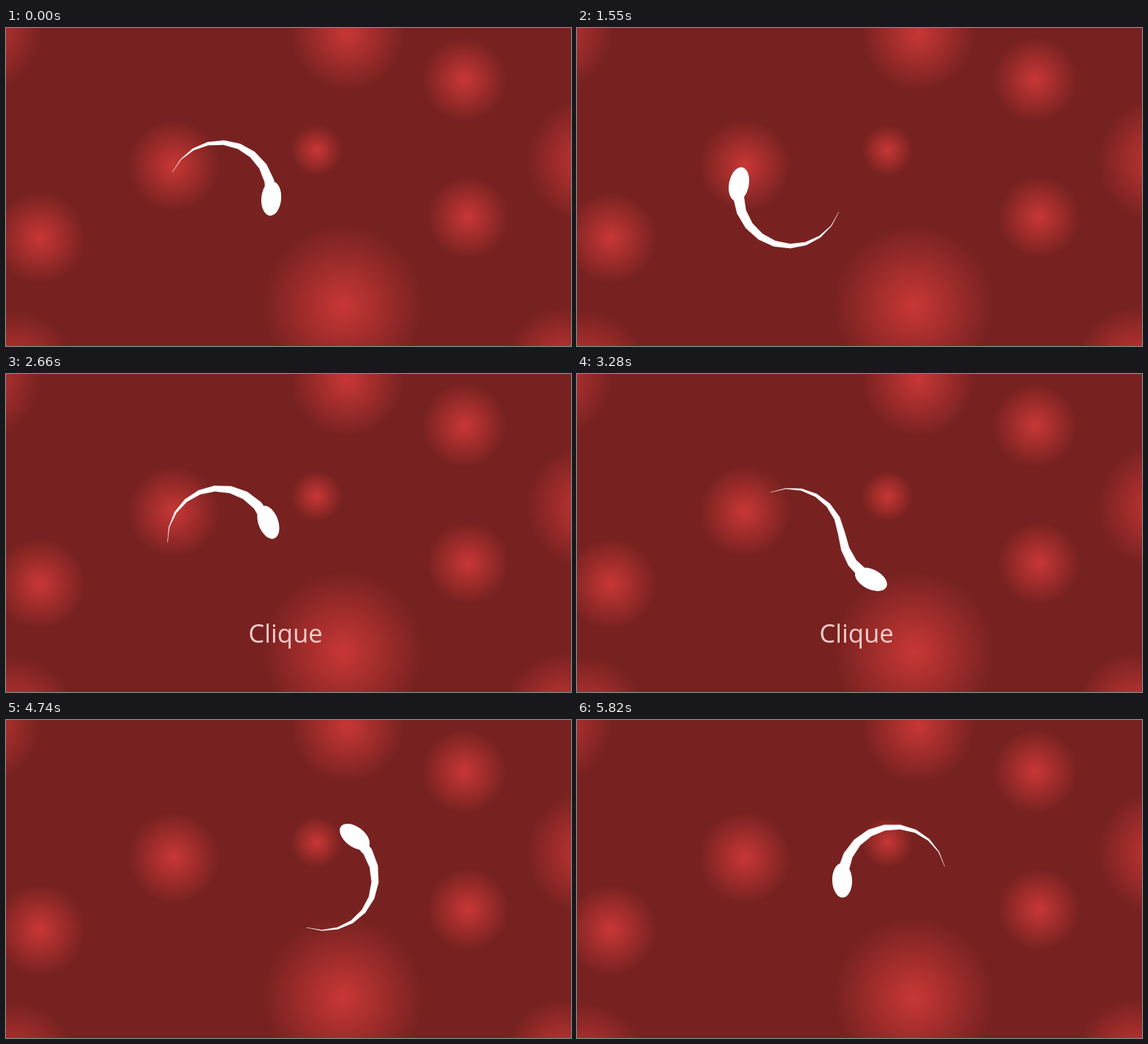
An HTML page with a canvas that plays this animation: 768 px wide and 432 px high, repeating every 5860 ms.

```html
<!DOCTYPE html>
<html lang="pt">
<head>
<meta charset="utf-8">
<title>Clique</title>
<style>
  html, body { margin: 0; width: 100%; height: 100%; overflow: hidden; background: #772220; }
  canvas { display: block; width: 768px; height: 432px; }
</style>
</head>
<body>
<canvas id="stage" width="768" height="432"></canvas>
<script>
const LOOP = 5860;
const canvas = document.getElementById('stage');
const ctx = canvas.getContext('2d');

// Background glows: x, y, radius
const GLOWS = [
  [464, 8, 77], [623, 70, 57], [422, 166, 34.5], [228, 187, 62],
  [46, 285, 62], [628, 257, 55.5], [458, 377, 109], [792, 180, 84],
  [758, 458, 79], [10, 470, 86], [-35, 4, 83]
];
canvas.style.background = GLOWS.map(([x, y, r]) =>
  `radial-gradient(${r}px at ${x}px ${y}px, #c83736, #c8373600)`
).join(',') + ', #772220';

// Key points of the ride: time in ms, degrees travelled
const RIDE = [
  [0, 0], [600, 69.4], [1260, 140], [1550, 186.2], [1890, 241], [2660, 335.2],
  [3690, 460], [3980, 481], [4350, 541], [4740, 580], [5820, 709], [LOOP, 709]
];
const RADIUS = 71;
const START = 4.6;            // angle on the left circle
const SWITCH = 351.2;         // degrees travelled before the turn flips
const LEFT = { x: 289.8, y: 225.8 };
const RIGHT = { x: 431.4, y: 215.4 };

// Trail points stay where they are dropped, at even spacing
const GAP = 17.5, TRAIL_START = -159.6, TRAIL_COUNT = 10, TAPER = 1.72;
const TRAIL_RADIUS = 70.4;

const rad = deg => deg * Math.PI / 180;

function travelled(t) {
  const i = RIDE.findIndex(([time]) => time > t);
  const [t0, s0] = RIDE[i - 1], [t1, s1] = RIDE[i];
  return s0 + (s1 - s0) * (t - t0) / (t1 - t0);
}

// Position and unit heading after travelling s degrees of the figure eight
function pathAt(s, radius) {
  const right = s > SWITCH;
  const c = right ? RIGHT : LEFT;
  const a = rad(right ? START + 2 * SWITCH - 180 - s : START + s);
  const dir = right ? -1 : 1;
  return {
    x: c.x + radius * Math.cos(a), y: c.y + radius * Math.sin(a),
    dx: -Math.sin(a) * dir, dy: Math.cos(a) * dir
  };
}

function drawTail(s) {
  const newest = Math.floor((s - TRAIL_START) / GAP);
  const outer = [], inner = [];
  for (let i = 0; i < TRAIL_COUNT; i++) {
    const p = pathAt(TRAIL_START + GAP * (newest - TRAIL_COUNT + 1 + i), TRAIL_RADIUS);
    const half = Math.max(0, i - 0.5) * TAPER / 2;
    outer.push([p.x + p.dy * half, p.y - p.dx * half]);
    inner.unshift([p.x - p.dy * half, p.y + p.dx * half]);
  }
  ctx.beginPath();
  outer.concat(inner).forEach(([x, y]) => ctx.lineTo(x, y));
  ctx.closePath();
  ctx.fill();
  ctx.lineWidth = 0.3;
  ctx.stroke();
}

function drawHead(s) {
  const p = pathAt(s, RADIUS);
  ctx.beginPath();
  ctx.ellipse(p.x, p.y, 23.4, 13.5, Math.atan2(p.dy, p.dx), 0, 2 * Math.PI);
  ctx.fill();
}

function drawHint(t) {
  if (t < 2510 || t > 3420) return;
  ctx.fillStyle = '#fcc';
  ctx.font = '34.5px "Open Sans", "Noto Sans", sans-serif';
  ctx.textAlign = 'center';
  ctx.fillText('Clique', 380, 365);
}

function draw() {
  const t = performance.now() % LOOP;
  const s = travelled(t);
  ctx.clearRect(0, 0, 768, 432);
  drawHint(t);
  ctx.fillStyle = ctx.strokeStyle = '#fff';
  drawTail(s);
  drawHead(s);
  requestAnimationFrame(draw);
}
draw();
</script>
</body>
</html>
```
